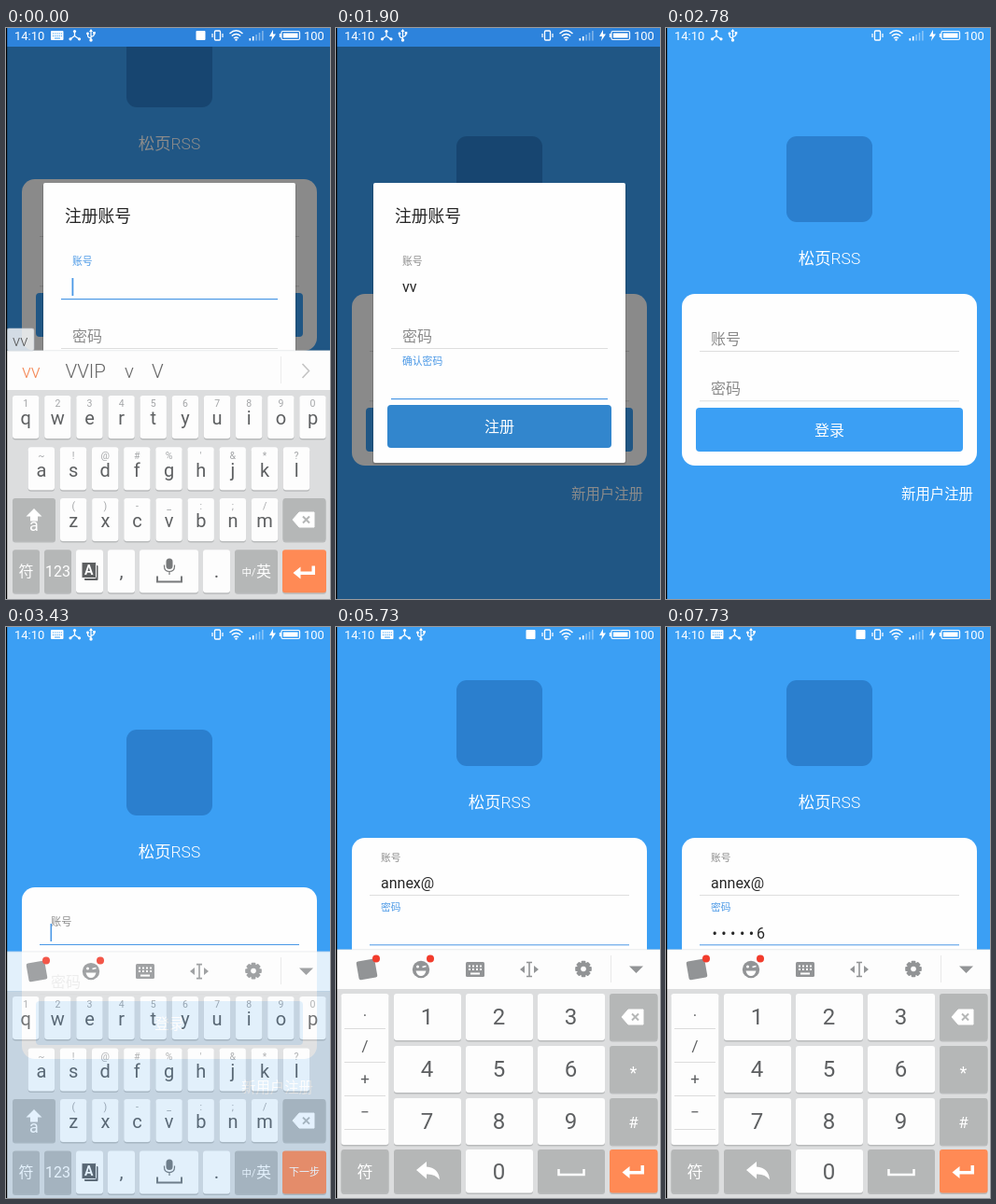
These frames come from a looping animation (347x612 px, 8 s). An HTML page:

```html
<!DOCTYPE html>
<html lang="zh-CN">
<head>
<meta charset="utf-8">
<title>注册与登录</title>
<style>
  html, body { margin: 0; width: 100%; height: 100%; overflow: hidden; background: #3b9ff4; }
  svg { display: block; width: 100%; height: 100%; }
  text { font-family: Roboto, "Noto Sans CJK SC", "Noto Sans CJK", sans-serif; white-space: pre; }
  .thin { font-weight: 300; }
  #dict { color: #5e6062; --paper: #fdfdfd; }
  #dict.off { color: #eceded; --paper: #a9abac; }
</style>
</head>
<body>
<svg id="stage" viewBox="0 0 347 612" xmlns="http://www.w3.org/2000/svg"></svg>
<script>
const LOOP = 8000;
const BLUE = '#3b9ff4', FOCUS = '#4a98e6', HINT = '#8a8a8a', LINE = '#dedede', INK = '#262626';
const DARK = '#b5b7b7', ORANGE = '#ff8a55', GLYPH = '#5e6062', ICON = '#929496';

// ---- markup helpers ----
const rect = (x, y, w, h, fill, r = 0, extra = '') =>
  `<rect x="${x}" y="${y}" width="${w}" height="${h}" rx="${r}" fill="${fill}" ${extra}/>`;
const text = (x, cy, size, str, fill, anchor = 'middle', extra = '') =>
  `<text x="${x}" y="${cy + size * 0.36}" font-size="${size}" fill="${fill}" text-anchor="${anchor}" ${extra}>${str}</text>`;
const left = (x, cy, size, str, fill, extra) => text(x, cy, size, str, fill, 'start', extra);
const fillPath = (d, fill, extra = '') => `<path d="${d}" fill="${fill}" ${extra}/>`;
const stroke = (d, color, w = 1, extra = '') =>
  `<path d="${d}" fill="none" stroke="${color}" stroke-width="${w}" ${extra}/>`;
const dot = (x, y, r, fill) => `<circle cx="${x}" cy="${y}" r="${r}" fill="${fill}"/>`;
const group = (id, body, extra = '') => `<g id="${id}" ${extra}>${body}</g>`;
const key = (x, y, w, h, fill = '#fdfdfd', id = '') =>
  rect(x, y + 1.5, w, h, '#b9bbbc', 3) + rect(x, y, w, h, fill, 3, id && `id="${id}"`);

// ---- status bar ----
function statusBar() {
  const W = '#fff';
  const keyboard = rect(48, 3, 13.5, 10, W, 1) +
    stroke('M50 6H60M50 8.5H60', BLUE, 1, 'stroke-dasharray="1.2 1"') + stroke('M52 11H58', BLUE);
  const share = stroke('M54 3V8.5L49 12M54 8.5L59 12', W, 1.3) +
    dot(54, 3.5, 1.6, W) + dot(49.5, 11.8, 1.6, W) + dot(59, 11.8, 1.6, W);
  const usb = stroke('M71.5 2V13M71.5 11C68 10 68 9 68 6.5M71.5 9.5C75 8.5 75 7.5 75 5', W, 1.2) +
    fillPath('M69.5 4L71.5 1L73.5 4Z', W) + dot(71.5, 13, 1.7, W) + dot(68, 6, 1.4, W) + rect(73.7, 4, 2.6, 2.6, W);
  const vibrate = rect(223.5, 3, 6, 10, 'none', 1, 'stroke="#fff" stroke-width="1.3"') +
    stroke('M221 6V10M232 6V10', W, 1.2);
  const wifi = stroke('M239.5 6Q246.5 -0.5 253.5 6M241.8 8.6Q246.5 4.2 251.2 8.6M244 11Q246.5 8.8 249 11', W, 1.4) +
    dot(246.5, 12.6, 1.2, W);
  const bars = [0, 1, 2, 3, 4].map(i =>
    rect(260.5 + i * 3.4, 11 - i * 2, 1.6, 2.5 + i * 2, W, 0, `opacity="${i < 2 ? 1 : 0.4}"`)).join('');
  const bolt = fillPath('M286 2L282 9H285L284 14L289 6.5H286Z', W);
  const battery = rect(295, 3.5, 19.5, 9, 'none', 1.5, 'stroke="#fff" stroke-width="1.2"') +
    rect(297, 5.5, 15.5, 5, W) + rect(292.8, 6, 1.8, 4, W);
  return rect(0, 0, 347, 20, '#2d83dc', 0, 'id="strip"') + left(9, 8.3, 13, '14:10', W) +
    group('kbIcon', keyboard) + group('links', share + usb) + rect(203.5, 3, 10, 10, W, 1, 'id="imeIcon"') +
    vibrate + wifi + bars + bolt + battery + left(319, 8.3, 13, '100', W);
}

// ---- login page ----
function page() {
  return rect(129, 116, 92, 92, '#2b7fce', 11) +
    text(175, 247, 17.4, '松页RSS', '#fff', 'middle', 'class="thin"') +
    rect(17, 285, 316, 184, '#fefefe', 14) +
    left(48, 333, 16, '账号', HINT, 'id="accLabel"') +
    left(48, 333, 16, 'annex@', INK, 'id="accText"') +
    rect(36, 346, 278, 1, LINE, 0, 'id="accLine"') +
    rect(47.5, 324, 1.6, 19, FOCUS, 0, 'id="accCaret"') +
    left(48, 386, 16, '密码', HINT, 'id="pwLabel"') +
    `<text id="pwText" x="49.5" y="393" font-size="16" fill="${INK}"><tspan id="pwDots" letter-spacing="4.4"></tspan><tspan id="pwLast" dx="-1.5"></tspan></text>` +
    rect(36, 399.3, 278, 1, LINE, 0, 'id="pwLine"') +
    rect(0, 377.5, 1.6, 19, FOCUS, 0, 'id="pwCaret"') +
    rect(32, 407, 286, 47, BLUE, 4) + text(175, 431, 16, '登录', '#fff') +
    text(329, 499, 15.4, '新用户注册', '#fff', 'end');
}

// ---- sign-up dialog, drawn from its own top edge ----
function dialog() {
  return rect(39, 1, 272, 301, '#000', 3, 'opacity=".14"') + rect(40, 0, 270, 300, '#fefefe', 2) +
    left(63, 36, 17.8, '注册账号', INK) +
    left(71, 84.5, 10.8, '账号', FOCUS, 'id="regLabel"') +
    left(71, 111, 16, 'vv', INK, 'id="regText"') +
    rect(59, 124, 232, 1.2, FOCUS, 0, 'id="regLine"') +
    rect(70.5, 102, 1.8, 19, FOCUS, 0, 'id="regCaret"') +
    left(71, 164, 16, '密码', HINT) + rect(59, 177, 232, 1, LINE) +
    left(71, 191, 10.8, '确认密码', FOCUS) + rect(59, 231, 232, 1.2, FOCUS) +
    rect(55, 238, 240, 46, BLUE, 4) + rect(55, 238, 240, 46, '#000', 4, 'id="press"') +
    text(175, 261, 16, '注册', '#fff');
}

// ---- keyboard ----
const backspace = (x, y) =>
  fillPath(`M${x - 12} ${y}L${x - 5} ${y - 8}H${x + 11}V${y + 8}H${x - 5}Z`, '#fff', 'stroke="#fff" stroke-linejoin="round"') +
  stroke(`M${x - 1} ${y - 3.5}l7 7m0 -7l-7 7`, DARK, 2);
const enterArrow = (x, y) =>
  fillPath(`M${x - 12} ${y + 2}l8 -6.5v5h12v-6h3.5v9.5h-15.5v4.5Z`, '#fff');
const spaceMark = (x, y, w, c, sw) => stroke(`M${x - w} ${y - 6}v6h${2 * w}v-6`, c, sw);

function toolbar() {
  const gear = Array.from({ length: 8 }, (_, i) =>
    rect(262.6, 357.7, 4.8, 5, ICON, 1, `transform="rotate(${i * 45} 265 366.5)"`)).join('');
  return rect(23, 357, 20, 20, ICON, 2, 'transform="rotate(-10 33 367)"') +
    dot(91, 367, 9.2, ICON) + dot(87.5, 364, 1.5, '#fff') + stroke('M92.5 364.5l4 -1', '#fff', 1.6) +
    fillPath('M85.5 368.5H96.5Q95 374 91 374Q87 374 85.5 368.5Z', '#fff') +
    dot(43, 355.5, 4, '#f23c2c') + dot(101, 355.5, 4, '#f23c2c') +
    rect(139, 359, 20, 16, ICON, 1.5) +
    stroke('M142 363.5H157M142 367H157', '#fff', 2, 'stroke-dasharray="2 2"') + stroke('M144 371.5H154', '#fff', 2) +
    stroke('M204 359.5H210M204 374.5H210M207 359.5V374.5', ICON, 1.6) +
    fillPath('M197 367l5 -4v8ZM217 367l-5 -4v8Z', ICON) +
    gear + dot(265, 366.5, 7, ICON) + dot(265, 366.5, 2.8, '#fff') +
    rect(294, 352, 1, 29, '#e8e8e8') + fillPath('M314 363.5H329L321.5 371Z', ICON);
}

function suggestions(id, words, chevron) {
  const row = words.map(([x, word], i) =>
    left(x, 367.5, 20.5, word, i ? '#666' : '#f58a58', 'class="thin"')).join('');
  return group(id, row + rect(294, 352, 1, 29, '#ececec') + stroke('M317.5 360l7 7.5l-7 7.5', chevron, 1.6));
}

function letters() {
  const P = 34.15;
  const rows = [['qwertyuiop', '1234567890', 7, 394], ['asdfghjkl', "~!@#%'&*?", 23.7, 449.3], ['zxcvbnm', '()-_:;/', 58, 504]];
  const keys = rows.map(([chars, hints, x0, y]) => [...chars].map((c, i) => {
    const x = x0 + i * P, mid = x + 14.2;
    return key(x, y, 28.3, 46, undefined, 'key-' + c) +
      text(mid, y + 8.5, 10.5, hints[i].replace('&', '&amp;'), '#a4a6a8') + text(mid, y + 24.2, 20, c, GLYPH);
  }).join('')).join('');
  const y = 559.3, h = 46;
  const shift = key(7, 504, 46, h, DARK) +
    fillPath('M30 515l8.5 8.5h-4.5v5h-8v-5h-4.5Z', '#fff') + text(30, 533, 18, 'a', '#fff');
  const paper = 'var(--paper)', book = 'currentColor';
  const dict = group('dict', rect(84, 576, 14.5, 16, book, 1) +
    rect(81, 572.5, 15.5, 17, book, 1, `style="stroke:${paper}"`) +
    text(88.7, 581, 14, 'A', paper, 'middle', `font-weight="700" style="fill:${paper}"`));
  const MIC = '#77797b';
  const mic = rect(171.5, 568.5, 7, 11.5, MIC, 3.5) +
    stroke('M169.5 575.5v1.5q0 5.5 5.5 5.5q5.5 0 5.5 -5.5v-1.5M175 582v4', MIC, 1.2) + spaceMark(175, 593.5, 13, MIC, 2);
  const bottom = key(7, y, 29, h, DARK) + text(21.5, 582.5, 16, '符', '#fff') +
    key(41, y, 29, h, DARK) + text(55.5, 582, 16, '123', '#fff') +
    key(75, y, 29, h, undefined, 'key-dict') + dict +
    key(109, y, 29, h) + text(123.5, 581, 21, ',', GLYPH) +
    key(143, y, 63, h) + mic +
    key(211, y, 29, h) + text(225.5, 581, 21, '.', GLYPH) +
    key(245, y, 46, h, DARK) + text(260, 583.5, 10.5, '中/', '#fff') + text(276, 582, 16, '英', '#fff') +
    key(296, y, 47, h, ORANGE) + group('enter', enterArrow(319.5, 582)) +
    text(319.5, 582, 11, '下一步', '#fff', 'middle', 'id="next"');
  return keys + shift + key(296.5, 504, 46, h, DARK) + backspace(319, 527) + bottom;
}

function numbers() {
  const cols = [62, 139, 216], rows = [393, 449, 505];
  let out = key(5.5, 393, 51, 162);
  [['·', 416], ['/', 449], ['+', 484], ['−', 520]].forEach(([c, y], i) => {
    out += text(31, y, 17, c, GLYPH) + rect(9, 430 + i * 36, 44, 1, '#dcdcdc');
  });
  for (let n = 1; n <= 9; n++) {
    const x = cols[(n - 1) % 3], y = rows[Math.floor((n - 1) / 3)];
    out += key(x, y, 72, 50, undefined, 'num-' + n) + text(x + 35.5, y + 24.5, 24, n, GLYPH);
  }
  rows.forEach(y => out += key(293, y, 51.5, 50, DARK));
  out += backspace(318, 418) + text(318.5, 478, 18, '*', '#fff') + text(318.5, 530.5, 17, '#', '#fff');
  out += key(5.5, 560, 51, 46.5, DARK) + text(31, 584, 17, '符', '#fff') +
    key(62, 560, 72, 46.5, DARK) + fillPath('M86 582l11 -9v5.5q13 1 14 14q-5 -6.5 -14 -6v5Z', '#fff') +
    key(139, 560, 72, 46.5) + text(174.5, 583, 24, '0', GLYPH) +
    key(216, 560, 72, 46.5, DARK) + spaceMark(252, 587, 13.5, '#fff', 2.5) +
    key(293, 560, 51.5, 46.5, ORANGE) + enterArrow(318.5, 582.5);
  return out;
}

const bubble = (id, w, str) => group(id,
  rect(1, 322, w, 24, '#f1f3f5', 2, 'opacity=".86" stroke="#c4ccd4" stroke-width=".6"') + left(7, 335, 17, str, '#555', 'class="thin"'));

document.getElementById('stage').innerHTML =
  rect(0, 0, 347, 612, BLUE) + group('page', page()) + rect(0, 0, 347, 612, '#000', 0, 'id="dim"') +
  group('dialog', dialog()) + statusBar() +
  group('keyboard', rect(0, 388, 347, 240, '#dcddde') + rect(0, 346, 347, 42, '#fdfdfd') + rect(0, 345.5, 347, 0.7, '#dfe3e6') +
    group('tools', toolbar()) +
    suggestions('pickV', [[17, 'vv'], [63.5, 'VVIP'], [127, 'v'], [156, 'V']], '#c4c4c4') +
    suggestions('pickA', [[17, 'a'], [55, 'annex@'], [149.5, 'are'], [198, 'and'], [252, 'AA']], '#8c8c8c') +
    group('letters', letters()) + group('numbers', numbers())) +
  bubble('bubbleV', 29, 'vv') + bubble('bubbleA', 22.5, 'a') + rect(0, 0, 1.2, 612, '#000');

// ---- motion ----
const el = {};
document.querySelectorAll('[id]').forEach(e => el[e.id] = e);
const set = (id, attrs) => { for (const a in attrs) el[id].setAttribute(a, attrs[a]); };
const show = (id, on) => { el[id].style.display = on ? '' : 'none'; };
const track = (t, steps) => {
  if (t <= steps[0][0]) return steps[0][1];
  for (let i = 1; i < steps.length; i++) {
    const [t0, a] = steps[i - 1], [t1, b] = steps[i];
    if (t < t1) return a + (b - a) * (t - t0) / (t1 - t0);
  }
  return steps[steps.length - 1][1];
};

const MOVES = {
  scroll: [[790, -123], [910, -12], [970, -5], [1080, 0], [3260, 0], [3380, -6], [5150, -6], [5320, -46], [5440, -59]],
  dialogY: [[790, 166], [910, 162], [970, 162], [1080, 166]],
  dialogAlpha: [[2500, 1], [2550, 0.5], [2605, 0]],
  dim: [[2500, 0.46], [2610, 0.37], [2670, 0.24], [2780, 0]],
  board: [[850, 1], [910, 0.86], [970, 0.45], [1020, 0.12], [1080, 0], [3260, 0], [3320, 0.25], [3430, 0.86], [3550, 1]],
  press: [[1670, 0], [1780, 0.16], [1950, 0.16], [2070, 0]],
  accY: [[3380, 333], [3430, 322], [3550, 306]],
  accSize: [[3380, 16], [3430, 11.2], [3490, 10.7]],
  pwY: [[5200, 386], [5400, 359]],
  pwSize: [[5200, 16], [5300, 11.2], [5400, 10.7]]
};
const DIGITS = [6140, 6370, 6550, 6780, 7010, 7190];

function floatLabel(id, y, size, active) {
  set(id, { y: y + size * 0.36, 'font-size': size, fill: active ? FOCUS : HINT });
}

function render(t) {
  const m = {};
  for (const k in MOVES) m[k] = track(t, MOVES[k]);
  const within = (a, b) => t >= a && t < b;

  set('page', { transform: `translate(0 ${m.scroll})` });
  set('dim', { opacity: m.dim });
  set('dialog', { transform: `translate(0 ${m.dialogY})`, opacity: m.dialogAlpha });
  set('press', { opacity: m.press });
  set('keyboard', { transform: `translate(0 ${(1 - m.board) * 15})`, opacity: m.board });

  // dialog field
  const regFocus = t < 420;
  set('regLabel', { fill: regFocus ? FOCUS : HINT });
  show('regLine', regFocus);
  show('regText', t >= 240);
  show('regCaret', t < 240);

  // login fields
  const accFocus = within(3320, 5200), pwFocus = t >= 5200;
  floatLabel('accLabel', m.accY, m.accSize, within(3480, 5200));
  floatLabel('pwLabel', m.pwY, m.pwSize, t >= 5260);
  set('accLine', { fill: accFocus ? FOCUS : LINE });
  set('pwLine', { fill: pwFocus ? FOCUS : LINE });
  show('accText', t >= 4640);
  show('accCaret', accFocus);
  set('accCaret', { x: t >= 4640 ? 106 : 47.5 });

  const n = DIGITS.filter(d => t >= d).length;
  el.pwDots.textContent = '•'.repeat(Math.max(0, n - 1));
  el.pwLast.textContent = n || '';
  set('pwCaret', { x: n ? 97.2 + (n - 5) * 10 : 47.5 });
  show('pwCaret', within(5260, 5670) || within(6140, 7730));

  // keyboard state
  const pickV = t < 240, pickA = within(4200, 4640), next = within(3200, 4200) || within(4640, 5200);
  const secret = within(420, 1080) || pwFocus;
  show('pickV', pickV);
  show('bubbleV', pickV);
  show('pickA', pickA);
  show('bubbleA', pickA);
  show('tools', !pickV && !pickA);
  show('next', next);
  show('enter', !next);
  show('letters', t < 5670);
  show('numbers', t >= 5670);
  set('dict', { class: secret ? 'off' : '' });
  set('key-dict', { fill: secret ? DARK : '#fdfdfd' });
  set('key-a', { fill: within(4020, 4130) ? '#cfd1d2' : '#fdfdfd' });
  DIGITS.forEach((d, i) => set('num-' + (i + 1), { fill: within(d, d + 57) ? '#cfd1d2' : '#fdfdfd' }));

  // status bar
  const kb = t < 850 || t >= 3320;
  show('kbIcon', kb);
  set('links', { transform: `translate(${kb ? 19.5 : 0} 0)` });
  show('imeIcon', t < 850 || t >= 3600);
  show('strip', t < 2580);
}

const start = performance.now();
function tick() {
  render((performance.now() - start) % LOOP);
  requestAnimationFrame(tick);
}
tick();
</script>
</body>
</html>
```
